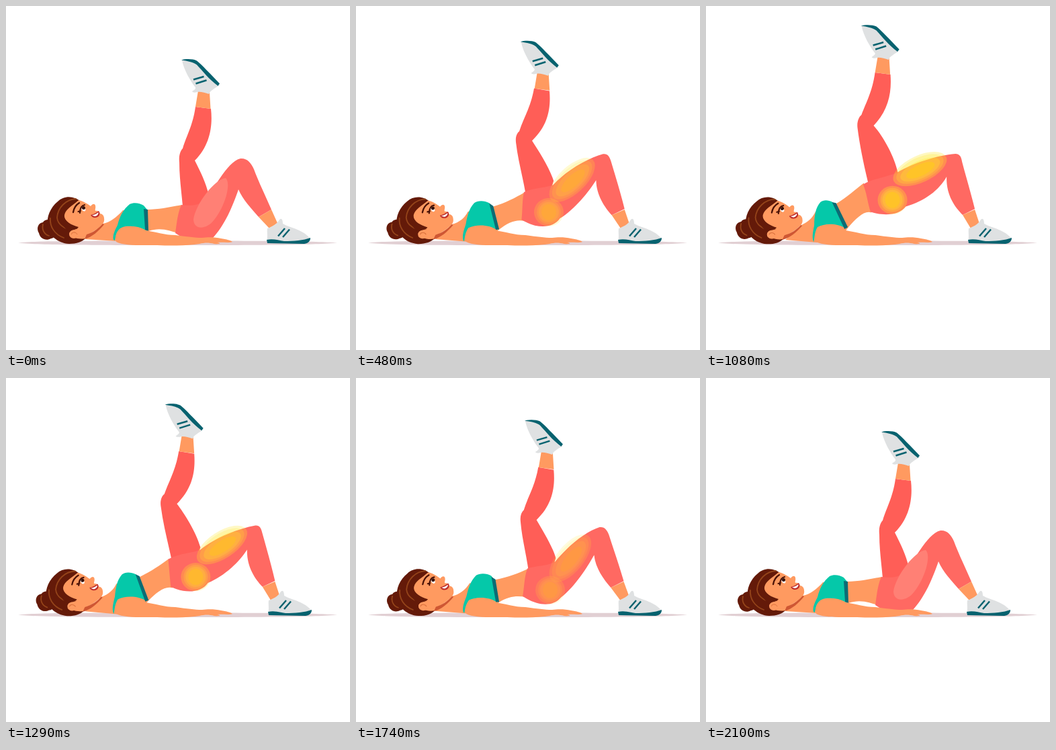
These frames come from a looping animation (512x512 px, 2250 ms). An HTML page:

```html
<!DOCTYPE html>
<html lang="en">
<head>
<meta charset="utf-8">
<title>Single-leg bridge</title>
<style>
  html, body { margin: 0; height: 100%; overflow: hidden; background: #fff; }
  svg { display: block; width: 100vw; height: 100vh; }
  .skin { fill: #ff9a60; }
  .shoe { fill: #dfe1e2; }
  .hair { fill: #641a09; }
  .line { fill: none; stroke: #07626f; stroke-width: 2.5; }
  .strand { fill: none; stroke: #94441a; stroke-width: 1.8; stroke-linecap: round; }
  .ink { fill: none; stroke: #4a1207; stroke-linecap: round; }
</style>
</head>
<body>
<svg viewBox="0 0 512 512">
  <path fill="#e1cfd3" d="M18 352.500C45 349.500 120 349.500 255 349.500C390 349.500 460 350 493 352.500C460 355.500 390 356 255 356C120 356 45 355.500 18 352.500Z"/>

  <path id="raised" fill="#ff5e57"/>
  <g id="foot">
    <path class="skin" d="M286 126L303 129L304.500 153L282 150Z"/>
    <path class="shoe" d="M262 81C270 79 278 82 284 86C292 94 304 107 316 119C310 123 304 126 302 131C296 129 289 127 285 128C281 129 278 129 277 127C280 125 284 123 281 120C275 112 265 96 262 81Z"/>
    <path fill="#07626f" d="M261 80.500C267 78.500 278 78.500 284 81.500C291 87 304 101 318 115.500L315.500 119C302 109 292 96 284 87.500C278 83 270 82 261 80.500Z"/>
    <path class="line" d="M279 109.500L294.500 105M282.500 115.500L298.500 110.500"/>
  </g>

  <path id="torso" class="skin"/>

  <g id="head">
    <path class="hair" d="M74 324C70 317 58 316 55 322C47 323 45 332 49 338C51 347 60 350 67 346C75 346 79 331 74 324Z"/>
    <path class="strand" d="M55 325C53 333 57 340 64 342"/>
    <path class="hair" d="M111 291C101 282 86 282 77 291C66 300 60 314 62 327C64 341 76 353 94 354C105 354 114 351 119 345L110 320Z"/>
    <path class="strand" d="M104 287C89 288 77 300 76 315C77 326 89 333 99 333M66 316C65 328 72 340 86 345"/>
    <path class="skin" d="M108 289C114 290 121 294 126 298C129 294 132 294 133 297C134 300 132 303 133 305C136 304 139 306 140 309C143 309 146 312 146 316C147 321 144 325 141 327C135 333 128 337 121 341L118 346C107 348 98 344 94 339C95 334 101 331 107 332C97 328 86 321 87 311C89 302 98 298 108 289Z"/>
    <path fill="#cf5733" d="M117 347L120 340C130 337 138 331 144 324L146 325C138 335 128 344 117 347Z"/>
    <path class="hair" d="M108 289C95 293 85 303 86 312C88 321 97 326 108 329C105 334 99 332 94 336C86 330 78 320 81 306C86 294 96 288 108 289Z"/>
    <ellipse class="skin" cx="101" cy="340" rx="7" ry="6"/>
    <path fill="none" stroke="#d9713d" d="M97 340C99 335 105 337 106 340"/>
    <path class="ink" stroke-width="2.300" d="M100 307C101 301 104 296 109 293"/>
    <ellipse cx="115" cy="301.500" rx="2.600" ry="4.500" fill="#fff" transform="rotate(-35 115 301.500)"/>
    <circle cx="115.500" cy="300.500" r="2.500" fill="#351008"/>
    <path class="ink" stroke-width="2.200" d="M110 308C110 302 112 297 117 296M111 305L107.500 306"/>
    <path fill="#bd2d2c" d="M126 311C131 310 135 307 138 305C141 309 139 315 132 315C129 315 127 313 126 311Z"/>
    <path fill="#fff" d="M128 311.500C132 311 135 309 137.500 307C138 310 135 313 132 313Z"/>
  </g>

  <path id="leg" fill="#ff6962"/>
  <path id="sheen" fill="#ff8075" d="M327 256C336 265 325 300 310 318C300 332 280 335 279 318C282 295 310 258 327 256Z"/>
  <g id="glows">
    <g id="thighGlow"></g>
    <g id="hipGlow"></g>
  </g>

  <path id="bra" fill="#05c8a9"/>
  <path id="band" fill="#0b6c75"/>
  <path class="skin" d="M164 351C161 339 167 330 178 328C190 327 200 330 208 334C222 336 236 341 252 341C268 343 280 345 292 345C300 344 312 344 320 346C328 347 335 349 337 351C332 353 322 351 314 352C322 353 318 355 310 354C302 352 296 352 288 354C270 357 245 357 225 356C200 356 175 357 164 351Z"/>

  <path id="ankle" class="skin"/>
  <g id="shoe">
    <path class="shoe" d="M391 331C397 329 405 325 409 318C412 315 414 318 414 324C424 330 446 333 455 347L453 350L390 350C392 343 390 337 391 331Z"/>
    <path fill="#07626f" d="M390 348C400 346 408 349 416 350C430 350 445 349 455 345C455 350 452 353 446 354L391 353Z"/>
    <path class="line" d="M407 342.500L417 331M414 344L424 332.500"/>
  </g>
</svg>
<script>
  const $ = id => document.getElementById(id);
  const LOOP = 2250, STEP = 30, MID = 0.59;

  // lift amount over time: [ms, 0 = hips down .. 1 = hips up]
  const lift = [[0, 0], [240, .26], [540, .59], [720, .79], [900, 1], [1050, 1],
    [1080, .98], [1500, .59], [1590, .495], [1740, .325], [2100, 0], [LOOP, 0]];

  // each shape at lift 0, MID and 1
  const shapes = {
    raised: [
      "M282 150L305 153C308 180 303 208 281 230C289 246 298 263 302 283L296 300L263 298C261 275 258 255 258 233C257 224 259 216 263 212C269 192 278 178 282 150Z",
      "M263 119L286 123C288 149 284 174 260 197C270 212 287 238 293 258L285 285L251 277C246 250 239 225 236 200C235 192 237 186 241 183C247 164 258 148 263 119Z",
      "M251 98L274 101C276 128 271 154 249 177C261 190 279 220 285 247L280 270L242 268C236 242 229 212 225 180C224 172 227 164 231 161C238 142 247 127 251 98Z"],
    torso: [
      "M118 347L144 324C155 322 165 314 174 304L190 305L210 303C230 303 245 299 262 296L258 338C245 336 232 328 212 335L200 346L165 350Z",
      "M118 347L143 325C153 322 161 316 166 306L190 300L203 298C222 291 235 284 249 275L250 318C238 315 226 321 212 333L200 346L165 351Z",
      "M118 348L142 326C151 322 158 316 163 306L180 295L193 294C210 284 222 272 234 263L246 307C236 303 224 315 211 330L200 346L165 352Z"],
    leg: [
      "M261 296C275 298 293 297 301 283C315 262 332 231 349 227C358 226 365 233 369 243C376 262 386 282 395 303L376 314C366 302 352 288 346 273C338 296 326 327 306 347C290 358 270 350 252 338C254 325 255 309 261 296Z",
      "M248 275C262 268 280 268 292 264C314 242 346 226 369 220C375 219 378 223 380 230C387 254 394 277 400 302L381 311C370 299 358 281 358 258C347 275 326 300 303 313C291 330 266 328 246 316C247 303 246 288 248 275Z",
      "M233 265C247 257 268 254 284 247C308 233 344 222 371 220C377 220 380 224 381 232C387 255 394 278 400 302L382 311C370 299 357 281 358 254C347 274 326 290 297 298C287 311 264 312 245 306C240 292 239 278 233 265Z"],
    bra: [
      "M160 348C158 341 163 332 166 326C169 314 174 303 184 295C190 292 199 293 205 297L210 303L210 335C196 326 181 327 170 331C165 336 163 342 162 349Z",
      "M160 350C157 342 161 332 163 325C165 313 167 302 175 293C180 289 190 289 197 293L201 298L210 333C196 324 178 325 167 330C162 338 162 344 161 350Z",
      "M160 351C157 343 160 333 161 326C161 312 163 300 170 292C175 288 182 289 188 292L193 297L209 331C192 322 176 324 166 329C161 337 162 345 160 352Z"],
    band: [
      "M205 302L211 303L212 335L207 333Z",
      "M197 293L203 297L213 332L208 333Z",
      "M187 292L193 293L211 329L206 332Z"],
    ankle: [
      "M376 314L395 303L404 323L392 331Z",
      "M381 311L400 303L407 324L394 331Z",
      "M382 311L400 303L407 324L394 331Z"]
  };
  const thigh = [[309, 287, -62], [322, 256, -41], [318, 242, -24]];
  const hip = [[290, 331], [286, 304], [277, 288]];

  // rings from the halo inwards: [rx, ry, cy]
  const ringStyle = [["#ffe628", .3], ["#ffe628", .25], ["#ffe628", .3], ["#ffcd19", .6]];
  function addRings(id, rings) {
    $(id).innerHTML = rings.map(([rx, ry, cy = 0], i) => {
      const [fill, alpha] = ringStyle[i];
      return `<ellipse rx="${rx}" ry="${ry}" cy="${cy}" fill="${fill}" fill-opacity="${alpha}"/>`;
    }).join("");
  }
  addRings("thighGlow", [[43, 20], [38, 17], [32, 13, 1], [23, 8.5, 2]]);
  addRings("hipGlow", [[22, 21], [18, 18], [15, 15], [11, 12]]);

  function liftAt(t) {
    const i = lift.findIndex(k => k[0] > t);
    const [t0, a] = lift[i - 1], [t1, b] = lift[i];
    return a + (b - a) * (t - t0) / (t1 - t0);
  }

  // quadratic through the three poses
  const blend = (p, [a, b, c]) =>
    a * (p - MID) * (p - 1) / MID +
    b * p * (p - 1) / (MID * (MID - 1)) +
    c * p * (p - MID) / (1 - MID);

  const nums = s => s.match(/[\d.]+/g).map(Number);
  const parts = Object.entries(shapes).map(([id, poses]) =>
    ({ el: $(id), form: poses[0], poses: poses.map(nums) }));
  const mix = (p, poses) => poses[0].map((v, i) => blend(p, poses.map(n => n[i])));

  function draw(t) {
    const p = liftAt(t);
    for (const { el, form, poses } of parts) {
      const v = mix(p, poses);
      let i = 0;
      el.setAttribute("d", form.replace(/[\d.]+/g, () => v[i++].toFixed(2)));
    }
    const move = (id, value) => $(id).setAttribute("transform", value);
    move("foot", `translate(${-31 * p} ${-52 * p})`);
    move("head", `translate(${-3 * p} ${p / 2}) rotate(${2 * p} 100 330)`);
    move("shoe", `translate(${-2 * Math.max(0, 1 - p * 5)} 0)`);
    const [x, y, a] = mix(p, thigh);
    move("thighGlow", `translate(${x} ${y}) rotate(${a})`);
    move("hipGlow", `translate(${mix(p, hip)})`);
    $("glows").style.opacity = p ** 0.6;
    $("sheen").style.opacity = Math.max(0, 1 - p * 5);
  }

  const start = performance.now();
  function tick() {
    const t = (performance.now() - start) % LOOP;
    draw(Math.floor(t / STEP) * STEP);
    requestAnimationFrame(tick);
  }
  tick();
</script>
</body>
</html>
```
